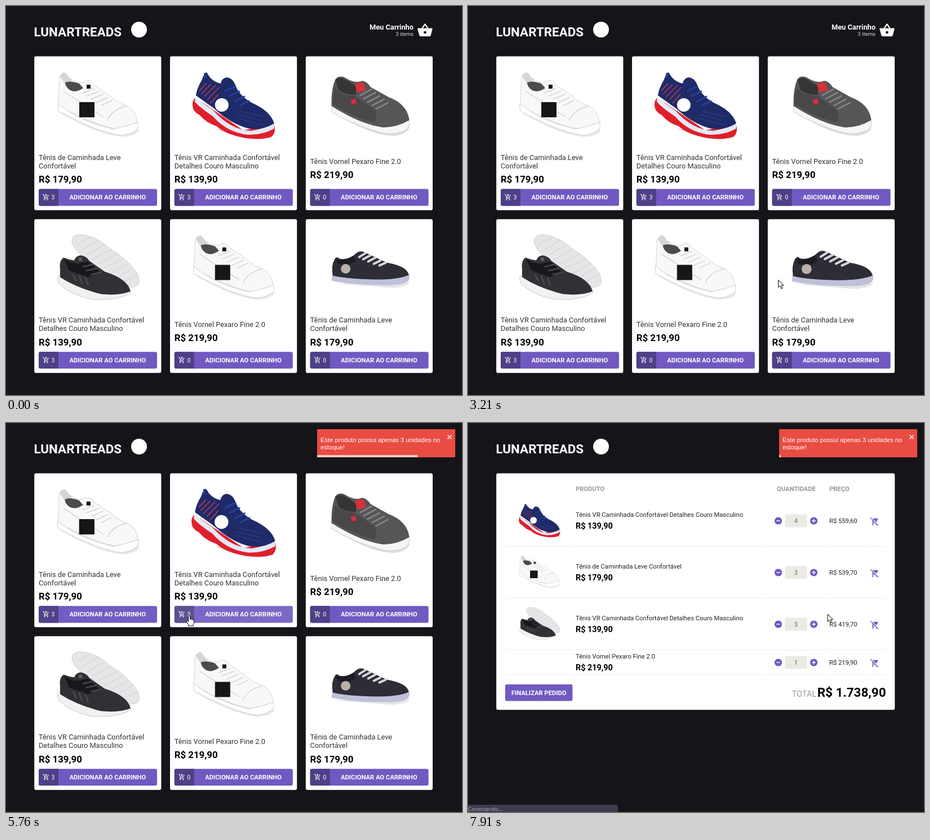
An HTML page that plays this animation: 809 px wide and 692 px high, repeating every 7.99 s.

```html
<!DOCTYPE html>
<html lang="pt-BR">
<head>
<meta charset="utf-8">
<style>
html, body { margin: 0; width: 100%; height: 100%; overflow: hidden; background: #151419; }
svg { display: block; font-family: Roboto, sans-serif; }
.b { font-weight: 700; }
.r { text-anchor: end; }
.m { text-anchor: middle; }
</style>
</head>
<body>
<svg id="stage" width="809" height="692" viewBox="0 0 809 692">
<defs>
  <path id="basket" d="M17.21 9l-4.38-6.56c-.19-.28-.51-.42-.83-.42-.32 0-.64.14-.83.43L6.79 9H2c-.55 0-1 .45-1 1 0 .09.01.18.04.27l2.54 9.27c.23.84 1 1.46 1.92 1.46h13c.92 0 1.69-.62 1.93-1.46l2.54-9.27L23 10c0-.55-.45-1-1-1zM9 9l3-4.4L15 9zm3 8c-1.1 0-2-.9-2-2s.9-2 2-2 2 .9 2 2-.9 2-2 2z"/>
  <path id="add" d="M11 9h2V6h3V4h-3V1h-2v3H8v2h3zm-4 9c-1.1 0-1.99.9-1.99 2S5.9 22 7 22s2-.9 2-2-.9-2-2-2zm10 0c-1.1 0-1.99.9-1.99 2s.89 2 1.99 2 2-.9 2-2-.9-2-2-2zm-9.83-3.25l.03-.12.9-1.63h7.45c.75 0 1.41-.41 1.75-1.03l3.86-7.01L19.42 4h-.01l-1.1 2-2.76 5H8.53l-.13-.27L6.16 6l-.95-2-.94-2H1v2h2l3.6 7.59-1.35 2.45c-.16.28-.25.61-.25.96 0 1.1.9 2 2 2h12v-2H7.42c-.13 0-.25-.11-.25-.25z"/>
  <path id="remove" d="M22.73 22.73L2.77 2.77 2 2l-.73-.73L0 2.54l4.39 4.39 2.21 4.66-1.35 2.45c-.16.28-.25.61-.25.96 0 1.1.9 2 2 2h7.46l1.38 1.38c-.5.36-.83.95-.83 1.62 0 1.1.89 2 1.99 2 .67 0 1.26-.33 1.62-.84L21.46 24zM7.42 15c-.14 0-.25-.11-.25-.25l.03-.12.9-1.63h2.36l2 2zm8.13-2c.75 0 1.41-.41 1.75-1.03l3.58-6.49c.08-.14.12-.31.12-.48 0-.55-.45-1-1-1H6.54zM7 18c-1.1 0-1.99.9-1.99 2S5.9 22 7 22s2-.9 2-2-.9-2-2-2z"/>

  <g id="white" stroke-linecap="round">
    <path fill="#e9e9eb" d="M95 190Q160 228 205 233Q232 232 236 220L200 210Z"/>
    <path fill="#f8f8f9" stroke="#d6d6d9" d="M95 126Q98 118 106 119Q113 131 124 134Q134 139 143 132Q152 132 155 140L185 160Q194 171 213 177Q231 185 233 207L200 219Q160 215 93 177Z"/>
    <path fill="#d5d5d8" d="M96 125Q100 117 107 120Q110 128 118 132L105 139Z"/>
    <path fill="#4b4b4e" d="M105 136Q115 132 130 138L137 146Q124 155 114 150Q105 144 105 136Z"/>
    <path fill="#fff" stroke="#cfcfd2" d="M92 174Q130 205 190 219Q215 214 234 207V217Q226 228 204 230Q160 224 93 187Z"/>
    <path fill="none" stroke="#d2d2d6" stroke-width="1.4" d="M136 155l20-8M143 160l21-8M151 166l21-9M160 172l20-9M169 177l19-9M180 203Q188 184 214 178M103 152L172 197"/>
    <path fill="#161617" d="M130 171h27v27h-27zM143 140h7v7h-7z"/>
  </g>

  <g id="navy" stroke-linecap="round">
    <path fill="#d9d9dc" d="M130 218Q190 244 233 234L220 224Z"/>
    <path fill="#e01f2b" d="M95 163Q88 169 91 182Q94 190 103 194Q113 207 133 214Q150 229 184 235Q214 239 231 232Q239 224 235 211L180 221Z"/>
    <path fill="#e6e9f5" d="M95 160Q104 171 126 185Q158 221 194 222Q218 219 235 207V218Q214 230 188 229Q151 225 126 196Q102 180 94 170Z"/>
    <path fill="#1f2a68" d="M107 131Q110 120 115 118L121 127Q128 135 140 138Q142 128 151 127Q162 128 167 143Q174 160 195 172Q229 187 235 209Q214 222 190 218Q158 210 128 182L96 159Q98 146 107 131Z"/>
    <path fill="none" stroke="#24409a" stroke-width="3" d="M112 127v-7M149 151l17-8M156 160l17-8M165 170l17-9M174 177l16-8"/>
    <path fill="none" stroke="#c8394d" stroke-width="1.5" d="M103 150l11-12M106 156l16-16M111 161l20-20M117 166l20-21M122 173l14-16"/>
    <path fill="none" stroke="#33457f" d="M169 193l40 10M174 187l42 10M166 199l50 13"/>
    <circle cx="142" cy="176" r="12" fill="#fff"/>
  </g>

  <g id="grey" stroke-linecap="round">
    <path fill="#dddde0" d="M110 196Q172 233 210 231Q233 226 234 215Z"/>
    <path fill="#f6f6f7" stroke="#cdcdd0" d="M96 176Q140 204 186 216Q216 213 233 202Q237 214 227 221Q209 230 187 226Q140 214 97 189Z"/>
    <path fill="#565557" d="M96 178Q95 147 103 130Q109 123 119 127Q138 139 150 133Q159 134 165 144L197 162Q230 174 234 203Q212 216 188 216Q148 211 96 178Z"/>
    <path fill="#353436" d="M103 132Q109 125 119 130L140 143L139 158Q119 158 108 149Z"/>
    <path fill="#484749" d="M102 145Q110 158 137 160L171 183Q180 190 172 207Q130 196 97 174Z"/>
    <path fill="none" stroke="#858386" stroke-width="2.6" d="M147 159l20-11M153 165l21-11M160 171l21-11M168 177l21-11M175 183l21-11"/>
    <path fill="#d9303a" d="M137 139l15-4 5 15-15 4zM130 167l8-2 3 8-9 2z"/>
  </g>

  <g id="black" stroke-linecap="round">
    <path fill="#e6e6e8" stroke="#d3d3d6" d="M117 130Q116 118 132 117Q159 118 186 143Q208 155 227 178Q240 193 235 206Q225 216 204 205Q171 185 145 163Q120 146 117 130Z"/>
    <path fill="none" stroke="#cfcfd3" d="M126 135l24-14M134 145l29-18M144 153l31-18M153 161l34-18M163 169l35-17M174 177l34-17M185 186l32-17M196 194l29-17M207 202l25-14"/>
    <path fill="#f1f1f2" stroke="#c8c8cb" d="M97 186Q88 193 94 204Q114 224 151 232Q202 235 222 220L216 211Z"/>
    <path fill="#303134" d="M96 178Q94 164 102 158Q112 162 121 163Q124 155 132 154Q142 155 148 164L175 183Q216 196 221 218Q202 226 169 223Q127 213 96 193Z"/>
    <path fill="#17181a" d="M103 160Q113 168 128 169L146 165L166 184L146 193L112 181Z"/>
    <path fill="none" stroke="#4b4c50" stroke-width="2.5" d="M119 188l5 11M130 191l5 13M141 194l5 13M137 174l17-4M143 181l18-4M151 188l17-4"/>
    <path fill="#5c5d61" d="M129 158h6v6h-6z"/>
  </g>

  <g id="dark" stroke-linecap="round">
    <path fill="#e5e5e7" d="M100 204L205 212Q233 209 234 202Z"/>
    <path fill="#bfc0d9" d="M97 188L233 187Q236 193 232 200Q222 207 200 207Q130 207 96 199Z"/>
    <path fill="#2c2d35" d="M98 190Q95 171 102 160Q105 155 110 160Q126 163 139 151Q145 145 153 148L194 167Q230 173 233 189Q218 196 184 197Q127 197 98 190Z"/>
    <path fill="#1b1c22" d="M102 160Q117 166 134 155L140 164Q126 174 108 169Z"/>
    <path fill="none" stroke="#d6d7dd" stroke-width="4" d="M145 157l11-7M152 161l13-7M161 165l13-7M171 169l12-6M181 172l11-5"/>
    <circle cx="121" cy="178" r="8.5" fill="#b9b1a9"/>
  </g>
</defs>
</svg>
<script>
const LOOP = 7990, ENTER = 520, TOAST = 4947, CART = 7770;
const PURPLE = '#7159c1', PITCH_X = 240.8, PITCH_Y = 289.6;
const stage = document.getElementById('stage');
const $ = id => document.getElementById(id);

const text = (x, y, size, str, fill = '#fff', attr = '') =>
  `<text x="${x}" y="${y}" font-size="${size}" fill="${fill}" ${attr}>${str}</text>`;
const rect = (x, y, w, h, fill, r = 0) =>
  `<rect x="${x}" y="${y}" width="${w}" height="${h}" rx="${r}" fill="${fill}"/>`;
const icon = (id, x, y, size, fill) =>
  `<use href="#${id}" fill="${fill}" transform="translate(${x} ${y}) scale(${size / 24})"/>`;
const shoeAt = (x, y, k) => `translate(${x} ${y}) scale(${k}) translate(-162.7 -172)`;
const BOLD = 'class="b"', MID = 'class="m"', BOLD_MID = 'class="b m"';

const easy = { lines: ['Tênis de Caminhada Leve', 'Confortável'], price: '179,90' };
const run = { lines: ['Tênis VR Caminhada Confortável', 'Detalhes Couro Masculino'], price: '139,90' };
const lite = { lines: ['Tênis Vornel Pexaro Fine 2.0'], price: '219,90' };
const cards = [['white', easy, 3], ['navy', run, 3], ['grey', lite, 0],
               ['black', run, 3], ['white', lite, 0], ['dark', easy, 0]];

function card([shoe, { lines, price }, count], i) {
  const top = lines.length > 1 ? 273.5 : 281;
  return `<g transform="translate(${i % 3 * PITCH_X} ${(i > 2) * PITCH_Y})">
    ${rect(50.2, 89.6, 225.2, 273.6, '#fff', 3)}
    <use id="shoe${i}" href="#${shoe}"/>
    ${lines.map((s, n) => text(58, top + n * 15, 12.8, s, '#333')).join('')}
    ${text(58, lines.length > 1 ? 314 : 306, 16.8, 'R$ ' + price, '#000', BOLD)}
    <g id="btn${i}">
      ${rect(58, 325.6, 210, 29.8, PURPLE, 3)}
      <path d="M93 325.6H61q-3 0-3 3v23.8q0 3 3 3h32z" fill="#4e3f87"/>
      ${icon('add', 64.6, 333.8, 12.8, '#fff')}
      ${text(80.6, 344, 10.6, count, '#fff', `id="count${i}"`)}
      ${text(180.3, 344, 11.2, 'ADICIONAR AO CARRINHO', '#fff', BOLD_MID)}
    </g></g>`;
}

const rows = [[174, 'navy', run, 4, '559,60'], [266, 'white', easy, 3, '539,70'],
              [358, 'black', run, 3, '419,70'], [426, '', lite, 1, '219,90']];

function row([y, shoe, { lines, price }, qty, sum]) {
  const end = y + (shoe ? 45.4 : 21.4);
  const round = (x, sign) => `<circle cx="${x}" cy="${y}" r="6.6" fill="${PURPLE}"/>
    <path d="M${x - 3.4} ${y}h6.8${sign}" stroke="#fff" stroke-width="1.4"/>`;
  return (shoe ? `<use href="#${shoe}" transform="${shoeAt(126.5, y - 3, .5)}"/>` : '') +
    text(191, y - 7, 11.2, lines.join(' '), '#222') +
    text(191, y + 13.5, 14.4, 'R$ ' + price, '#000', BOLD) +
    round(550.5, '') + round(613.5, `m-3.4-3.4v6.8`) +
    rect(562.3, y - 11.5, 39.4, 23, '#ebebe4', 3) + text(582, y + 4, 11.2, qty, '#666', MID) +
    text(641, y + 4, 11.2, 'R$ ' + sum, '#222') + icon('remove', 713.5, y - 7, 16, PURPLE) +
    `<path d="M67 ${end}H186M188 ${end}H526M528 ${end}H635M637 ${end}H702M704 ${end}H741" stroke="#eee"/>`;
}

stage.insertAdjacentHTML('beforeend', `
  ${text(49.5, 54, 22.4, 'LUNARTREADS', '#fff', BOLD)}
  <circle cx="236" cy="42" r="14" fill="#fff"/>
  ${text(723, 42, 12.8, 'Meu Carrinho', '#fff', 'class="b r"')}
  ${text(723, 53, 9.6, '3 items', '#ddd', 'class="r"')}
  ${icon('basket', 729, 28.8, 28.8, '#fff')}
  <g id="shop">${cards.map(card).join('')}</g>
  <g id="cart">
    ${rect(50.2, 89.6, 707, 420.6, '#fff', 3)}
    ${[[191, 'PRODUTO'], [548, 'QUANTIDADE'], [641, 'PREÇO']].map(([x, s]) => text(x, 121, 11.2, s, '#999', BOLD)).join('')}
    ${rows.map(row).join('')}
    ${rect(66, 465, 119.4, 29.4, PURPLE, 3)}
    ${text(125.7, 483.7, 11.2, 'FINALIZAR PEDIDO', '#fff', BOLD_MID)}
    ${text(618, 487, 14.4, 'TOTAL', '#999', 'class="r"')}
    ${text(741.5, 486.5, 22.4, 'R$ 1.738,90', '#000', 'class="b r"')}
    <path d="M0 679H263q3 0 3 3v10H0z" fill="#3b3c4c"/>
    ${text(0, 690, 9.6, 'Conectando...', '#b4b5c0', `font-family="'Open Sans', sans-serif"`)}
  </g>
  <g id="toast" font-family="'Liberation Sans', Arial, sans-serif">
    ${rect(552, 11, 245, 50, '#e84c43', 1)}
    ${text(558, 34, 11.2, 'Este produto possui apenas 3 unidades no')}
    ${text(558, 46.5, 11.2, 'estoque!')}
    <path d="M783.5 21.5l7 7m0-7l-7 7" stroke="#fff" stroke-opacity=".7" stroke-width="2"/>
    <rect id="bar" x="552" y="57" height="4" fill="#fff" fill-opacity=".7"/>
  </g>
  <g id="pointer" fill="#fff" stroke="#000" stroke-linejoin="round">
    <path id="arrow" d="M0 0V13.4L3.1 10.5 5.3 15.6 7.6 14.6 5.4 9.7H9.4Z"/>
    <path id="hand" d="M-1.5 1.5Q0-1 1.5 1.5V6.5L4 6.4 6 7.3 8.3 8.3V13.2L7 16V18.4H-1.6V16.2L-5 11.2Q-5.3 8.4-3.3 9.2L-1.5 11Z"/>
  </g>`);

const path = [
  [520, 757, 532], [900, 480, 330], [1200, 250, 190], [1370, 224, 176], [1600, 222, 173],
  [1750, 222, 173], [2050, 410, 200], [2400, 640, 225], [2520, 675, 231], [2670, 675, 231],
  [2950, 640, 400], [3150, 600, 480], [3360, 430, 505], [3600, 200, 480], [3750, 175, 385],
  [3820, 172, 352], [4000, 167, 333], [4590, 167, 333], [4680, 173, 333], [5140, 173, 333],
  [5220, 173, 341], [5500, 240, 343], [5990, 400, 342], [6250, 443, 344], [6450, 443, 340],
  [6910, 443, 340], [7300, 560, 344], [7500, 638, 340], [LOOP, 638, 340]];

function pointerAt(t) {
  if (t < ENTER) return [-99, -99];
  const i = path.findIndex(p => p[0] > t);
  const [t0, x0, y0] = path[i - 1], [t1, x1, y1] = path[i];
  const u = (t - t0) / (t1 - t0);
  return [x0 + (x1 - x0) * u, y0 + (y1 - y0) * u];
}

function inside([px, py], i, x, y, w, h) {
  const dx = px - x - i % 3 * PITCH_X, dy = py - y - (i > 2) * PITCH_Y;
  return dx >= 0 && dx <= w && dy >= 0 && dy <= h;
}
const onCard = (p, i) => inside(p, i, 50.2, 89.6, 225.2, 273.6);
const onButton = (p, i) => inside(p, i, 58, 325.6, 210, 29.8);

// Share of the last 200 ms spent on an element: a linear hover transition.
const recent = t => Array.from({ length: 20 }, (_, k) => pointerAt(t - k * 10));
const share = (trail, test, i) => trail.filter(p => test(p, i)).length / trail.length;

const bounce = [[0, 3000], [.6, -25], [.75, 10], [.9, -5], [1, 0]];
function bounceIn(p) {
  if (p >= 1) return 0;
  const i = bounce.findIndex(b => b[0] > p);
  const [p0, x0] = bounce[i - 1], [p1, x1] = bounce[i];
  return x0 + (x1 - x0) * (1 - (1 - (p - p0) / (p1 - p0)) ** 3);
}

const show = (id, on) => $(id).setAttribute('display', on ? 'inline' : 'none');

function draw(t) {
  const trail = recent(t), tip = trail[0], inCart = t >= CART;
  show('shop', !inCart);
  show('cart', inCart);
  cards.forEach((_, i) => {
    $('shoe' + i).setAttribute('transform', shoeAt(162.7, 172, 1 + .045 * share(trail, onCard, i)));
    $('btn' + i).setAttribute('opacity', 1 - .2 * share(trail, onButton, i));
  });
  $('count1').textContent = t < 6700 ? 3 : 4;
  $('count2').textContent = t < 7600 ? 0 : 1;

  const age = t - TOAST;
  show('toast', age >= 0);
  if (age >= 0) {
    $('toast').setAttribute('transform', `translate(${bounceIn(age / 750)})`);
    $('toast').setAttribute('opacity', Math.min(1, 1 - (1 - Math.min(1, age / 450)) ** 3));
    $('bar').setAttribute('width', 245 * Math.max(0, 1 - age / 3000));
  }

  const hand = !inCart && cards.some((_, i) => onButton(tip, i));
  show('hand', hand);
  show('arrow', !hand);
  $('pointer').setAttribute('transform', `translate(${tip})`);
}

const start = performance.now();
function tick() {
  draw((performance.now() - start) % LOOP);
  requestAnimationFrame(tick);
}
tick();
</script>
</body>
</html>
```
